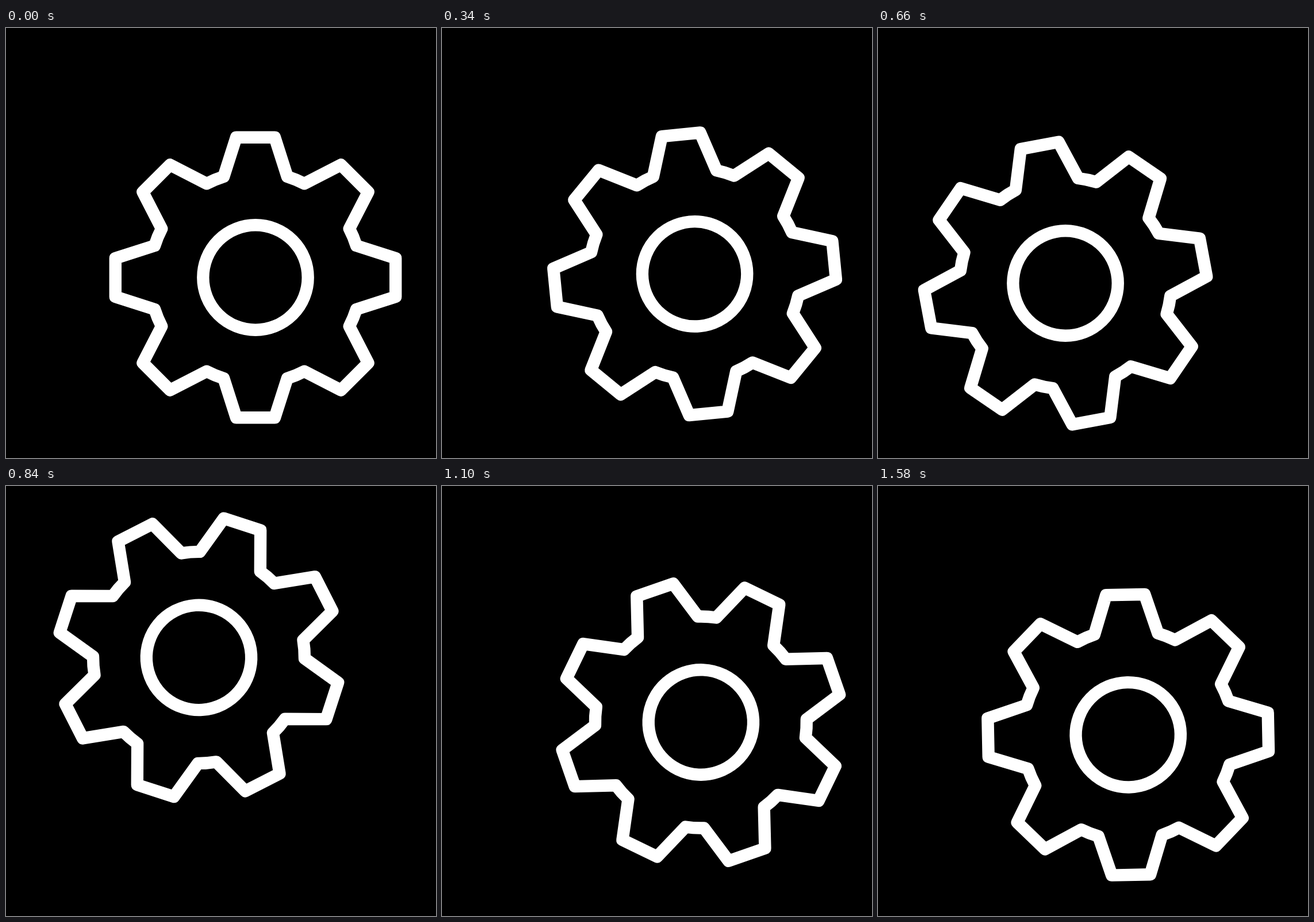
Animation of 748 by 748 pixels, one loop 1.6 s. Source, as an HTML page with a canvas:

```html
<!DOCTYPE html>
<html>
<head>
<meta charset="utf-8">
<style>
  html, body { margin: 0; width: 100%; height: 100%; overflow: hidden; background: #000; }
  canvas { display: block; }
</style>
</head>
<body>
<canvas id="stage" width="748" height="748"></canvas>
<script>
const ctx = document.getElementById('stage').getContext('2d');
const LOOP = 1600, STEP = 20, RAD = Math.PI / 180;

// time (ms), rotation (deg), speed (deg/ms): wind up, spin, overshoot, settle
const KEYS = [
  [0, 0, 0], [230, -10.2, 0], [540, 31, 0.29], [660, 79.4, 0.51], [840, 198, 0.7],
  [960, 280.9, 0.6], [1080, 335, 0.31], [1280, 365, 0], [1500, 357.5, 0], [1600, 360, 0.07]
];

function rotationAt(t) {
  const i = KEYS.findIndex(key => key[0] > t);
  const [t0, a0, v0] = KEYS[i - 1], [t1, a1, v1] = KEYS[i];
  const d = t1 - t0, s = (t - t0) / d, r = 1 - s;
  return r * r * ((1 + 2 * s) * a0 + s * d * v0) + s * s * ((3 - 2 * s) * a1 - r * d * v1);
}

function makeGear(outer, inner, hole) {
  const path = new Path2D();
  for (let k = 0; k < 8; k++) {
    const mid = k * 45;
    for (const side of [-7.83, 7.83]) {
      const a = (mid + side) * RAD;
      path.lineTo(outer * Math.cos(a), outer * Math.sin(a));
    }
    path.arc(0, 0, inner, (mid + 17.5) * RAD, (mid + 27.5) * RAD);
  }
  path.closePath();
  path.moveTo(hole, 0);
  path.arc(0, 0, hole, 0, 2 * Math.PI);
  return path;
}

const gear = makeGear(246, 184, 91.2);
ctx.strokeStyle = '#fff';
ctx.lineWidth = 21.4;
ctx.lineJoin = 'round';

function draw(now) {
  const t = Math.floor(now / STEP + 0.05) * STEP % LOOP;
  ctx.fillStyle = '#000';
  ctx.fillRect(0, 0, 748, 748);
  ctx.save();
  ctx.translate(374, 374);
  ctx.rotate(rotationAt(t) * RAD);
  ctx.translate(60, 60);
  ctx.stroke(gear);
  ctx.restore();
  requestAnimationFrame(draw);
}
draw(0);
</script>
</body>
</html>
```
